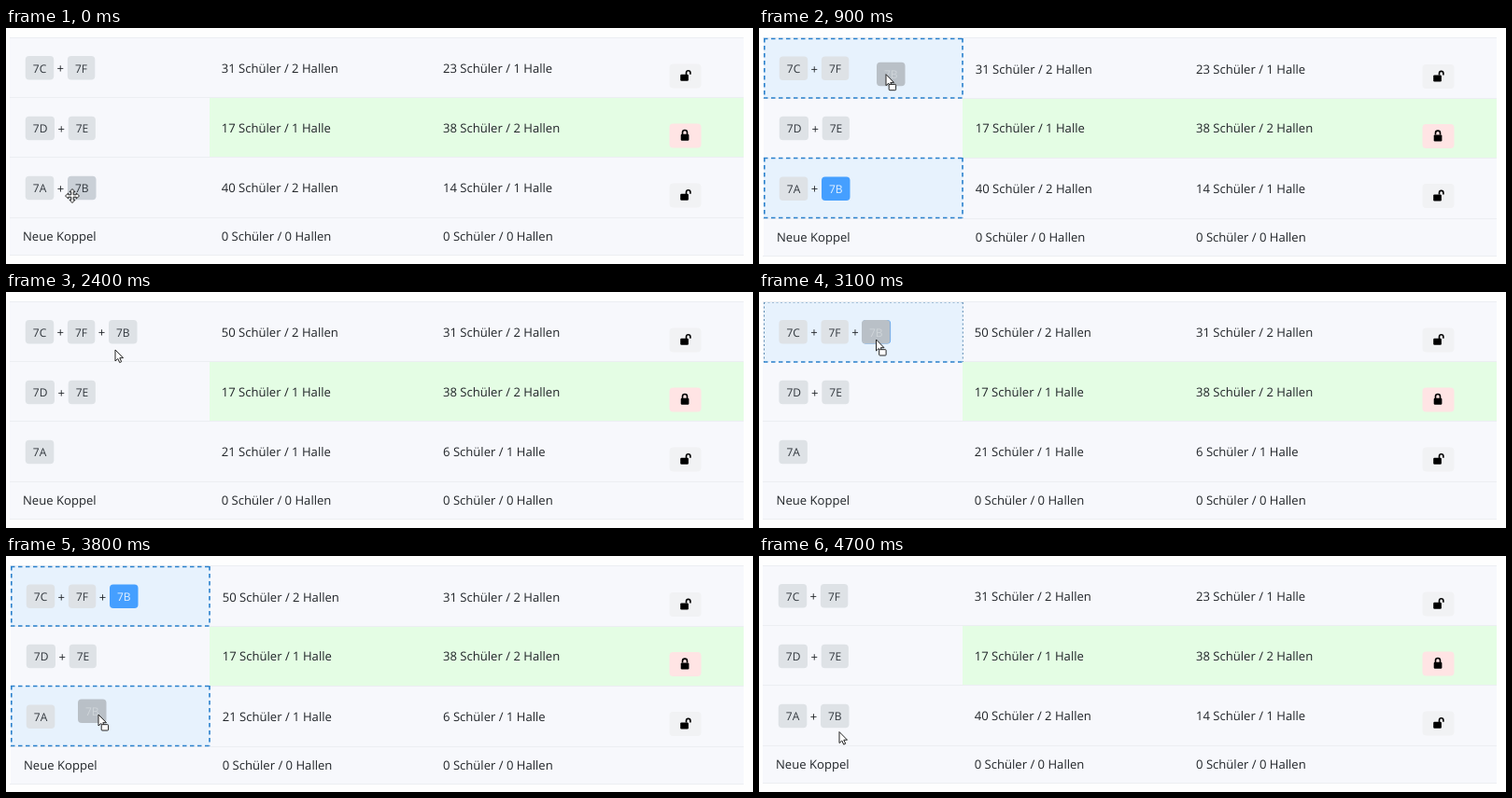
An HTML page for the animation above (4.8 s loop, 800 by 253 pixels).

```html
<!DOCTYPE html>
<html lang="de">
<head>
<meta charset="utf-8">
<style>
html, body { margin: 0; width: 100%; height: 100%; overflow: hidden; background: #fefefe; }
svg { display: block; width: 800px; height: 253px; font: 13.08px "Open Sans", "Noto Sans", sans-serif; fill: #212529; text-rendering: geometricPrecision; }
.chip { font-size: 12px; fill: #32383e; }
.line { stroke: #eceef2; }
.dash { fill: none; stroke: #2a80cc; stroke-width: 1.6; stroke-dasharray: 4.5 3.5; }
.dots { fill: none; stroke: #5f8db3; stroke-dasharray: 2 2.5; }
.icon { fill: #000; }
.icon path { fill: none; stroke: #000; stroke-width: 1.6; }
.pointer { fill: #fff; stroke: #222; stroke-width: 1; stroke-linejoin: round; }
</style>
</head>
<body>
<svg id="stage" viewBox="0 0 800 253"></svg>
<script>
const LOOP = 4800, STEP = 100;
const DROP_1 = 1400, DROP_2 = 4100;
const stage = document.getElementById('stage');

// Each key: time, x, y
const cursorKeys = [
  [0, 71, 180], [200, 76, 172], [500, 152, 85], [800, 135, 50], [1300, 140, 48.5], [1700, 140, 48.5],
  [2100, 117, 62], [2600, 117, 62], [2900, 125, 50], [3100, 125.5, 51], [3200, 125.5, 62],
  [3500, 127.5, 170], [3800, 99, 170], [4000, 90, 178], [4100, 88, 180], [4300, 86, 188.5]
];
const ghostKeys = [
  [200, 66, 159], [500, 142, 72], [800, 125, 37], [1300, 130, 36],
  [3100, 110, 30], [3200, 110, 41], [3500, 111.5, 149], [3800, 77, 153.5], [4000, 68, 161]
];

function track(keys, t) {
  const i = keys.findIndex(k => k[0] > t);
  if (i < 0) return keys[keys.length - 1].slice(1);
  if (i === 0) return keys[0].slice(1);
  const a = keys[i - 1], b = keys[i], p = (t - a[0]) / (b[0] - a[0]);
  return [a[1] + (b[1] - a[1]) * p, a[2] + (b[2] - a[2]) * p];
}

const rect = (x, y, w, h, fill, more = '') =>
  `<rect x="${x}" y="${y}" width="${w}" height="${h}" fill="${fill}" ${more}/>`;
const text = (x, y, s, more = '') => `<text x="${x}" y="${y}" ${more}>${s}</text>`;
const path = (kind, d) => `<path class="${kind}" d="${d}"/>`;
const move = (x, y, s) => `<g transform="translate(${x} ${y})">${s}</g>`;
const pupils = (n, halls) => `${n} Schüler / ${halls} Halle${halls === 1 ? '' : 'n'}`;

const chipWidth = { C: 30.4, F: 29.4, D: 31.2, E: 29.2, A: 30.5, B: 30.5 };

function chip(x, y, letter, look = '') {
  const fills = { hover: '#cad0d7', picked: '#459fff', ghost: '#b9c0c7' };
  const inks = { picked: '#e4f1ff', ghost: '#cfd4d9' };
  const ink = inks[look] ? `style="fill:${inks[look]}"` : '';
  return rect(x, y, chipWidth[letter], 25.5, fills[look] || '#dee2e6', 'rx="4"') +
    text(x + 8, y + 17.5, '7' + letter, `class="chip" ${ink}`);
}

function chips(letters, y, dx, look) {
  let x = 20.8 + dx, out = '';
  [...letters].forEach((c, i) => {
    if (i) {
      out += text(x + 3.4, y + 18, '+');
      x += 14.7;
    }
    out += chip(x, y, c, c === 'B' ? look : '');
    x += chipWidth[c];
  });
  return out;
}

function padlock(y, closed) {
  const shackle = closed ? 'M-2.5 -1V-3a2.5 2.5 0 0 1 5 0v2' : 'M2 -1V-3a2.2 2.2 0 0 1 4.4 0v1.8';
  return rect(710.5, y - 12.5, 34, 26, closed ? '#ffe4e4' : '#f1f2f4', 'rx="4"') +
    move(closed ? 727 : 726.5, y, `<g class="icon">
      <rect x="-4.3" y="-1.2" width="8.7" height="7" rx="1.2"/><path d="${shackle}"/></g>`);
}

// mode: faint = just entered, thin = picked up, full = drop allowed
function zone(top, bottom, mode) {
  const fill = rect(5, top, 213.5, bottom - top, mode === 'faint' ? '#f0f6fc' : '#e7f2fd');
  const upper = `M5 ${top + .5}H218.5`, lower = `M5 ${bottom}H218.5`;
  const sides = x => `M${x} ${top}V${bottom}M${223.8 - x} ${top}V${bottom}`;
  if (mode === 'full') return fill + path('dash', upper + lower + sides(5.8));
  return fill + path('dots', sides(5.5)) + `<g opacity=".5">${path('dots', upper)}</g>` +
    (mode === 'thin' ? path('dash', lower) : `<g opacity=".5">${path('dots', lower)}</g>`);
}

const arrow = path('pointer', 'M0 0V12L2.8 9.5L4.7 13.6L6.7 12.7L4.8 8.7H8.5Z');
const pointers = {
  arrow,
  drag: arrow + '<rect class="pointer" x="3.2" y="10.7" width="7.4" height="6.3" rx=".8"/>',
  move: path('pointer', `M0 -7.5L3 -4.3H1.2V-1.2H4.3V-3L7.5 0L4.3 3V1.2H1.2V4.3H3L0 7.5
    L-3 4.3H-1.2V1.2H-4.3V3L-7.5 0L-4.3 -3V-1.2H-1.2V-4.3H-3Z`),
  denied: `<g fill="#e5dfdf" stroke="#a34a42" stroke-width="2">
    <circle r="5"/><path d="M-3.5 -3.5L3.5 3.5"/></g>`
};

function draw(t) {
  const moved = t >= DROP_1 && t < DROP_2;
  const first = t >= 200 && t < DROP_1, second = t >= 3100 && t < DROP_2;
  const dragging = first || second;
  const entered = first ? 600 : 3500;
  const mode = !dragging ? '' : t > entered ? 'full' : 'thin';
  const full = mode === 'full' ? 1 : 0;
  const dx = full || (dragging ? .6 : 0);
  const dy = full * .6;
  const [cx, cy] = track(cursorKeys, t);

  const home = moved ? { x: 110, y: 30 } : { x: 66, y: 159 };
  const over = cx >= home.x && cx <= home.x + 31 && cy >= home.y && cy <= home.y + 25.5;
  const look = dragging ? 'picked' : over && cx < home.x + 28 ? 'hover' : '';
  const pointer = dragging ? (cy > 75 && cy < 139 ? 'denied' : 'drag') : over ? 'move' : 'arrow';

  const rows = [
    { y: 44, chips: moved ? 'CFB' : 'CF', a: moved ? [50, 2] : [31, 2], b: moved ? [31, 2] : [23, 1], dy },
    { y: 108, chips: 'DE', a: [17, 1], b: [38, 2], dy: 0, closed: true },
    { y: 172, chips: moved ? 'A' : 'AB', a: moved ? [21, 1] : [40, 2], b: moved ? [6, 1] : [14, 1], dy },
    { y: 224, a: [0, 0], b: [0, 0], dy }
  ];

  let out = rect(4 + full, 10.5, 786 - full, 233 + full, '#f7f8fc') +
    rect(218, 75 + full, 572, 64 - full, '#e4fde4');
  for (const y of [10.5, 74.5, 138.5, 203.5, 243.5]) {
    out += path('line', `M4 ${y + (y > 11 ? full : 0)}H790`);
  }
  if (dragging) {
    const zones = [[11, 75], [139, 203.5]];
    const [source, target] = first ? zones.reverse() : zones;
    out += zone(...source, mode);
    if (t >= entered) out += zone(...target, full ? 'full' : 'faint');
  }
  for (const r of rows) {
    const base = r.y + 4.2 + r.dy;
    out += r.chips ? chips(r.chips, r.y - 14 + (r.y > 100 ? .8 : 0) + r.dy, dx, look)
      : text(18 + dx, base, 'Neue Koppel');
    out += text(230.7 + full, base, pupils(...r.a)) + text(468, base, pupils(...r.b));
    if (r.chips) out += padlock(r.y + 7 + dy, r.closed);
  }
  if (dragging) out += chip(...track(ghostKeys, t), 'B', 'ghost');
  stage.innerHTML = out + move(cx, cy, pointers[pointer]);
}

let shown = -1;
function tick() {
  const t = Math.floor(performance.now() % LOOP / STEP) * STEP;
  if (t !== shown) draw(shown = t);
  requestAnimationFrame(tick);
}
tick();
</script>
</body>
</html>
```
